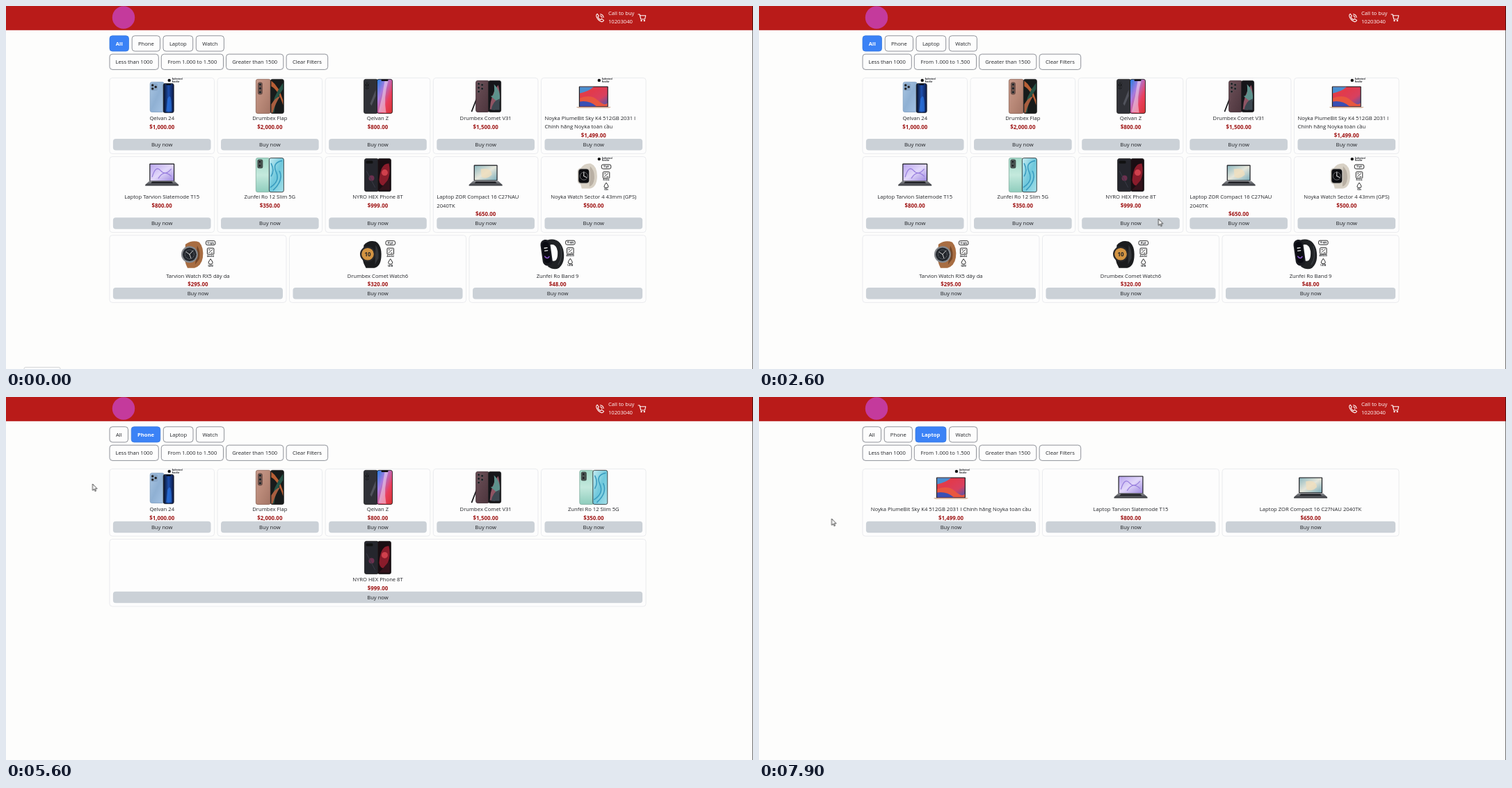
Animation of 1074x522 px, one loop 8 s. Source, as an HTML page:

```html
<!DOCTYPE html>
<html lang="vi">
<head>
<meta charset="utf-8">
<title>Shop</title>
<style>
html, body { margin: 0; width: 100%; height: 100%; overflow: hidden; background: #fdfdfc; }
svg { display: block; }
text { font: 7.65px "Open Sans", "Noto Sans", sans-serif; fill: #222428; }
.mid { text-anchor: middle; }
.price { font-size: 7.9px; font-weight: 700; fill: #a01818; }
.on { font-weight: 700; fill: #fff; }
.head { fill: #fff; }
.tiny { font-size: 2.7px; font-weight: 700; }
.line { fill: none; stroke: #fff; stroke-width: 1.1; stroke-linecap: round; stroke-linejoin: round; }
#all, #phone, #laptop, #tip, #arrow, #hand, #cursor { animation: 8s step-end infinite; }
#all { animation-name: all; }
#phone { animation-name: phone; }
#laptop { animation-name: laptop; }
#tip { animation-name: tip; }
#hand { animation-name: hand; }
#arrow { animation-name: arrow; }
#cursor { animation-name: move; }
@keyframes all { 0% { visibility: visible } 47%, to { visibility: hidden } }
@keyframes phone { 0% { visibility: hidden } 47% { visibility: visible } 82%, to { visibility: hidden } }
@keyframes laptop { 0% { visibility: hidden } 82%, to { visibility: visible } }
@keyframes tip { 0% { visibility: visible } 1.25%, to { visibility: hidden } }
@keyframes hand {
  0% { visibility: hidden } 42.5% { visibility: visible } 51.25% { visibility: hidden }
  73.75% { visibility: visible } 86.25%, to { visibility: hidden }
}
@keyframes arrow {
  0% { visibility: hidden } 11.25% { visibility: visible } 42.5% { visibility: hidden }
  51.25% { visibility: visible } 73.75% { visibility: hidden } 86.25%, to { visibility: visible }
}
/* the pointer advances ten times a second */
@keyframes move {
  0% { transform: translate(49px, 477px) }
  11.25% { transform: translate(49px, 477px); animation-timing-function: steps(10) }
  23.75% { transform: translate(600px, 466px); animation-timing-function: steps(2) }
  26.25% { transform: translate(734.5px, 420px) }
  27.5% { transform: translate(734.5px, 420px); animation-timing-function: steps(13) }
  43.75% { transform: translate(214px, 50px) }
  45% { transform: translate(213.5px, 47.5px) }
  47% { transform: translate(203px, 52px) }
  48.75% { transform: translate(203px, 52px); animation-timing-function: steps(4) }
  53.75% { transform: translate(88px, 148px) }
  67.5% { transform: translate(88px, 148px); animation-timing-function: steps(2) }
  70% { transform: translate(124.5px, 125px); animation-timing-function: steps(5) }
  76.25% { transform: translate(239.5px, 57px) }
  83.75% { transform: translate(239.5px, 57px); animation-timing-function: steps(4) }
  88.75%, to { transform: translate(104.5px, 175px) }
}
</style>
</head>
<body>
<svg id="stage" width="1074" height="522" viewBox="0 0 1074 522"></svg>
<script>
const rect = (x, y, w, h, fill, rx = 0, extra = '') =>
  `<rect x="${x}" y="${y}" width="${w}" height="${h}" rx="${rx}" fill="${fill}" ${extra}/>`;
const dot = (x, y, r, fill, extra = '') => `<circle cx="${x}" cy="${y}" r="${r}" fill="${fill}" ${extra}/>`;
const path = (d, fill, extra = '') => `<path d="${d}" fill="${fill}" ${extra}/>`;
const curve = (d, color, w) => path(d, 'none', `stroke="${color}" stroke-width="${w}" stroke-linecap="round"`);
const text = (x, y, s, cls = '') => `<text x="${x}" y="${y}" class="${cls}">${s}</text>`;

let defs = '';
const grad = (id, dir, ...colors) => {
  const [x2, y2] = dir;
  const stops = colors.map((c, i) => `<stop offset="${i / (colors.length - 1)}" stop-color="${c}"/>`).join('');
  defs += `<linearGradient id="${id}" x2="${x2}" y2="${y2}">${stops}</linearGradient>`;
  return `url(#${id})`;
};
const down = [0, 1], diag = [1, 1], across = [1, 0];
const paint = {
  sky: grad('sky', diag, '#a9c5e2', '#8fb0d3', '#a5c3e4'),
  night: grad('night', across, '#0a1024', '#1d4fae', '#0b1740'),
  bronze: grad('bronze', diag, '#c79a8c', '#b98978', '#a37465'),
  neon: grad('neon', diag, '#1f7fe0', '#a77be0', '#ea3f5d', '#d43332'),
  wine: grad('wine', diag, '#6d5058', '#4b343c'),
  desert: grad('desert', diag, '#e0473f', '#e23a4c', '#d8405f', '#3f57b8'),
  lilac: grad('lilac', diag, '#b9a5ee', '#e2d8fa', '#9f8ae0'),
  mint: grad('mint', down, '#a3d9c9', '#c4e9dd', '#8fcdbd'),
  lagoon: grad('lagoon', diag, '#c5ecf2', '#6fc8dc', '#a5e0e8'),
  mist: grad('mist', diag, '#8fb9c0', '#e6e6da', '#7fb0bd'),
  steel: grad('steel', down, '#8b8d92', '#33353a')
};

const phone = (x, y, w, h, fill, edge = '#222') =>
  rect(x, y, w, h, fill, 2.5, `stroke="${edge}" stroke-width=".8"`);
const lenses = (x, y, n, gap) =>
  Array.from({ length: n }, (_, i) => dot(x, y + i * gap, 1.7, '#15181d', 'stroke="#777" stroke-width=".4"')).join('');
const badge = x => dot(x, -22.5, 2.2, '#111') + text(x + 4, -23, 'Authorised', 'tiny') + text(x + 4, -19.6, 'Reseller', 'tiny');
const laptop = (w, top, bottom, screen, base) =>
  rect(-w, top, 2 * w, bottom - top, '#1c1d22', 1) +
  rect(-w + 1.2, top + 1.2, 2 * w - 2.4, bottom - top - 2.4, screen) + base;
const deck = path('M-18 9H18L24 14.5V16H-24V14.5Z', paint.steel) + path('M-14 10H14L16 12.5H-16Z', '#202126');
const specs = (y, days, screen, depth) =>
  rect(11.5, y, 13.5, 6, '#fff', 2, 'stroke="#111" stroke-width=".9"') + text(18.2, y + 4, days, 'tiny mid') +
  rect(13.5, y + 10.5, 9.5, 9, '#fff', 1, 'stroke="#111" stroke-width=".9"') +
  curve(`M15.5 ${y + 17.5}L21 ${y + 12.5}M15.5 ${y + 13}h2M19 ${y + 17.5}h2`, '#111', .8) +
  text(18.2, y + 23, screen, 'tiny mid') +
  path(`M18.2 ${y + 26}q-6 7.5 0 7.5t0-7.5`, '#fff', 'stroke="#111" stroke-width=".9"') +
  text(18.2, y + 37.3, depth, 'tiny mid');

const art = {
  blue: phone(-17, -20, 20, 43, paint.sky, '#7d9dc0') + rect(-16, -18.5, 10, 11, '#8aa9cb', 3) +
    lenses(-13.5, -15.5, 2, 5) + lenses(-9, -13, 1, 0) + phone(2, -18, 15, 42, paint.night) +
    path('M8 4Q14-8 14 22H6Z', '#2e7ff0', 'opacity=".6"') + rect(6, -17.5, 7, 1.8, '#080a12', 1) + badge(10.5),
  fold: phone(-20, -24, 21, 49, paint.bronze, '#8c6253') + rect(-17.5, -20, 7, 18, '#6c4f47', 3) + lenses(-14, -16.5, 3, 5.5) +
    phone(1, -24, 19, 49, '#171b1b') + path('M2-22Q13-14 19 6V13Q12-9 2-14Z', '#b95f35') +
    path('M2 23Q4 0 19-19V-10Q8 4 6 24Z', '#275447') + path('M2 12Q8 2 15 0Q8 10 4 24H2Z', '#a85d3f'),
  notch: phone(-20, -24, 20, 49, '#303137') + rect(-18, -21, 5, 11, '#15161a', 2.5) + lenses(-15.5, -18.5, 2, 5.5) +
    path('M-11 11L-3-9V0L-9 14Z', '#51535c') + phone(-1, -24, 22, 49, paint.neon, '#111') +
    path('M1 23Q7 0 10-22H15Q8 2 12 24Z', '#f3d9ee', 'opacity=".55"') + rect(5, -24, 10, 2.5, '#111', 1),
  pen: curve('M-10-4L-20 22', '#17181b', 1.7) + phone(-14, -22, 19, 45, paint.wine, '#3b282f') +
    lenses(-10, -17.5, 3, 5.6) + lenses(-5, -16, 2, 5.5) + phone(4, -22, 18, 45, '#151519') +
    path('M6 19Q7-2 18-16Q24 5 13 20Z', '#8f5564') + path('M7 0Q14 1 12-17Q24-5 19 10Z', '#5d918c') +
    path('M8 20Q10 7 20 4V20Z', '#3d4851'),
  air: laptop(21, -14, 16, paint.desert, path('M-25 15.5H25Q24 17.3 21 17.3H-21Q-24 17.3-25 15.5Z', '#d4b29c')) +
    path('M-19.8-12.8H0Q-8-6-19.8-4Z', '#4a8fd0') + path('M-19.8 3Q-4-3 6 6T19.8 10V14.8H-19.8Z', '#e8573f') +
    path('M-19.8 14.8V8Q-6 6 4 14.8Z', '#3a4fb4') + badge(8),
  slate: laptop(18, -16, 10, paint.lilac, deck) + curve('M-14 3Q-9-14-2-6T13-8M-5 5Q3-8 13 2', '#9a80de', 1.3),
  mint: phone(-20, -24, 20, 49, paint.mint, '#80ad9e') + rect(-18, -22, 8, 13, '#45514e', 2.5) + lenses(-14.5, -18.5, 2, 5.5) +
    phone(-1, -24, 21, 49, paint.lagoon) + curve('M1 18Q15 9 9-4T17-20M5 22Q20 8 14-5M2 2Q7-6 2-16', '#3a9dc0', 1.6),
  game: phone(-19, -23, 20, 47, '#25262d') + rect(-17, -20, 10, 4, '#111', 1.5) + dot(-9, 5, 4, '#6b304f') +
    curve('M-16-5L-4 18', '#393b46', 1) + phone(0, -23, 19, 47, '#190d12') +
    path('M2 8Q4-17 16-16Q20 2 10 16Q3 16 2 8Z', '#8a1c2b') + dot(10, -3, 4.5, '#d0404c') + path('M2 22L17 5V22Z', '#33131b'),
  modern: laptop(17, -14, 9, paint.mist, deck) + path('M-7-8Q8-11 9 0Q1 8-6 3Z', '#f0dfbd', 'opacity=".8"'),
  square: path('M-18-10Q-13-17-4-16Q6-12 5 5Q4 18-5 20H-17Q-18 15-20 10Z', '#d8d1c5') +
    path('M-5-12Q2-6 1 6Q0 15-6 17Z', '#b9b0a4') + rect(-23, -9.5, 18, 23, '#c9c4bc', 5) + rect(-21.5, -8, 15, 20, '#0d0e11', 4) +
    curve('M-14 2V-4M-14 2L-10 4', '#fff', .9) + dot(-14, 2, 5.5, 'none', 'stroke="#8d8d91" stroke-width=".7"') +
    specs(-14.5, '18 giờ', 'Retina', '50m') + badge(8),
  leather: path('M-18-13Q-8-20 2-16Q9-8 7 6Q5 18-5 21H-15Q-18 15-19 9Z', '#a86d42') +
    path('M-1-11Q4-3 2 8L-4 16Z', '#744728') + dot(-12, 1.5, 12, '#85888d') + dot(-12, 1.5, 9.8, '#22262c') +
    dot(-12, 1.5, 6.5, 'none', 'stroke="#b3b7bd" stroke-width=".8" stroke-dasharray="1 1.5"') +
    curve('M-17-2L-12 1.5L-7-4M-12 1.5L-10 7', '#ddd', .9) + specs(-18, '14 ngày', 'Amoled', '5ATM'),
  sport: path('M-20-12Q-13-20-3-17Q6-12 5 5Q4 19-5 21H-17Q-21 14-22 8Z', '#1b1c1e') +
    path('M-3-12Q2-5 1 7L-4 16Z', '#34363a') + dot(-14.5, 1, 11, '#29282a') + dot(-14.5, 1, 8.8, '#d39442') +
    `<text x="-14.5" y="4" class="mid" style="font-weight:700;font-size:8px">10</text>` + specs(-18, '40 giờ', 'Amoled', '5ATM'),
  band: path('M-15-19Q2-24 8-6Q12 12 2 21Q-5 25-14 19L-10 10Q1 15 0-3Q-2-15-12-12Z', '#202225') +
    curve('M4-10Q8 6 1 16', '#3b3e43', 1.4) + `<g transform="rotate(-8 -15 -1)">` +
    rect(-23, -20, 14, 38, '#191a20', 7) + rect(-21, -17, 10, 31, '#0a0b12', 5) +
    curve('M-18-8h4M-18-4h4', '#eee', 1.4) + curve('M-19 4Q-16 9-13 5', '#8c56d0', 1.6) + '</g>' +
    specs(-18.5, '14 ngày', 'AMOLED', '5 ATM')
};

const longA = 'Noyka PlumeBit Sky K4 512GB 2031 I', longB = 'Chính hãng Noyka toàn cầu';
const goods = {
  blue: ['1,000', 'Qelvan 24'],
  fold: ['2,000', 'Drumbex Flap'],
  notch: ['800', 'Qelvan Z'],
  pen: ['1,500', 'Drumbex Comet V31'],
  air: ['1,499', longA, longB],
  slate: ['800', 'Laptop Tarvion Slatemode T15'],
  mint: ['350', 'Zunfei Ro 12 Slim 5G'],
  game: ['999', 'NYRO HEX Phone 8T'],
  modern: ['650', 'Laptop ZOR Compact 16 C27NAU', '2040TK'],
  square: ['500', 'Noyka Watch Sector 4 43mm (GPS)'],
  leather: ['295', 'Tarvion Watch RX5 dây da'],
  sport: ['320', 'Drumbex Comet Watch6'],
  band: ['48', 'Zunfei Ro Band 9']
};

function card(key, x, y, w, h) {
  const [price, ...lines] = goods[key], cx = x + w / 2;
  const wrap = w < 200 && lines.length > 1;
  const name = wrap
    ? lines.map((s, i) => text(x + 5, y + 60.8 + i * 12.2, s)).join('')
    : text(cx, y + 60.8, lines.join(' '), 'mid');
  return rect(x, y, w, h, '#fdfdfd', 4, 'stroke="#e2e4e8" stroke-width=".7"') +
    `<g transform="translate(${cx} ${y + 26})">${art[key]}</g>` + name +
    text(cx, y + (wrap ? 85.3 : 73.1), `$${price}.00`, 'price mid') +
    rect(x + 5, y + h - 21.3, w - 10, 16.4, '#cbd1d7', 4) + text(cx, y + h - 10.3, 'Buy now', 'mid');
}

function row(keys, y, h) {
  const gap = 4.5, w = (771.2 - gap * (keys.length - 1)) / keys.length;
  return keys.map((k, i) => card(k, 148.9 + i * (w + gap), y, w, h)).join('');
}

const button = (x, end, y, label, on) =>
  rect(x, y, end - x, 22.2, on ? '#3b82f6' : '#fdfdfd', 4, `stroke="${on ? '#3577de' : '#6b6f78'}" stroke-width=".75"`) +
  text((x + end) / 2, y + 13.9, label, on ? 'mid on' : 'mid');

// edges: left and right sides of the four tabs
function scene(id, active, edges, rows) {
  const tabs = ['All', 'Phone', 'Laptop', 'Watch']
    .map((s, i) => button(edges[2 * i], edges[2 * i + 1], 42.8, s, i === active)).join('');
  return `<g id="${id}">${tabs}${rows}</g>`;
}

const header = rect(0, 0, 1074, 34.8, '#b91b19') + dot(169, 16.5, 16.2, '#c43a9c') +
  text(866, 13.2, 'Call to buy', 'head') + text(866, 25.2, '10203040', 'head') +
  `<g class="line"><path d="M850.2 11.2q-1.8 1-1.5 3.2q1.5 6 7.4 8.2q2.6.2 3.4-2l-3-2.2-1.8 1.4q-2.7-1.2-3.8-4l1.4-1.6zM854.5 14q2 .4 2.4 2.6M854.5 11.8q4 .6 4.6 4.6"/>
  <path d="M909 12h2l1.8 7h5.7l1.2-5.2h-8.2"/><circle cx="913.5" cy="21.2" r=".6"/><circle cx="917.8" cy="21.2" r=".6"/></g>`;

const filters = [[149, 219.3, 'Less than 1000'], [223.3, 312.5, 'From 1.000 to 1.500'],
  [316.6, 398.8, 'Greater than 1500'], [403.1, 462.7, 'Clear Filters']]
  .map(([a, b, s]) => button(a, b, 69.2, s)).join('');

const scenes =
  scene('all', 0, [149, 176.5, 181.2, 221.5, 226, 268.7, 273.3, 313.4],
    row(['blue', 'fold', 'notch', 'pen', 'air'], 103.4, 109) +
    row(['slate', 'mint', 'game', 'modern', 'square'], 216.6, 109) +
    row(['leather', 'sport', 'band'], 329.7, 96.7)) +
  scene('phone', 1, [149, 175.5, 180.2, 221.8, 226.3, 269, 273.5, 313.6],
    row(['blue', 'fold', 'notch', 'pen', 'mint'], 103.4, 96.7) + row(['game'], 204.4, 96.7)) +
  scene('laptop', 2, [149, 175.5, 180.2, 220.4, 225, 269, 273.5, 313.8],
    row(['air', 'slate', 'modern'], 103.4, 96.7));

const ink = 'stroke="#222" stroke-width=".8" stroke-linejoin="round"';
const cursor = '<g id="cursor">' +
  path('M0 0V9.4L2.2 7.4 3.6 10.6 5 10 3.6 6.9H6.5Z', '#fff', ink + ' id="arrow"') +
  `<g id="hand">${path('M-1 1Q0-.6 1 1V5Q2 4 2.9 5.2 4 4.5 4.6 5.7 6 5.2 6.2 6.6V9.5Q6 11 5 13.2H-.2Q-1.5 11-3.3 8.6-4 7-2.4 7L-1 8.2Z', '#fff', ink)}` +
  `${curve('M1 5V7M2.9 5.5V7.2M4.6 6V7.4', '#222', .6)}</g></g>`;

const tip = rect(26, 519.6, 52, 8, '#fff', 2, 'id="tip" stroke="#c6c8ca" stroke-width=".8"');

document.getElementById('stage').innerHTML =
  `<defs>${defs}</defs>` + rect(0, 0, 1074, 522, '#fdfdfc') + header + filters + scenes + tip +
  rect(1073, 0, 1, 522, '#000', 0, 'opacity=".55"') + cursor;
</script>
</body>
</html>
```
